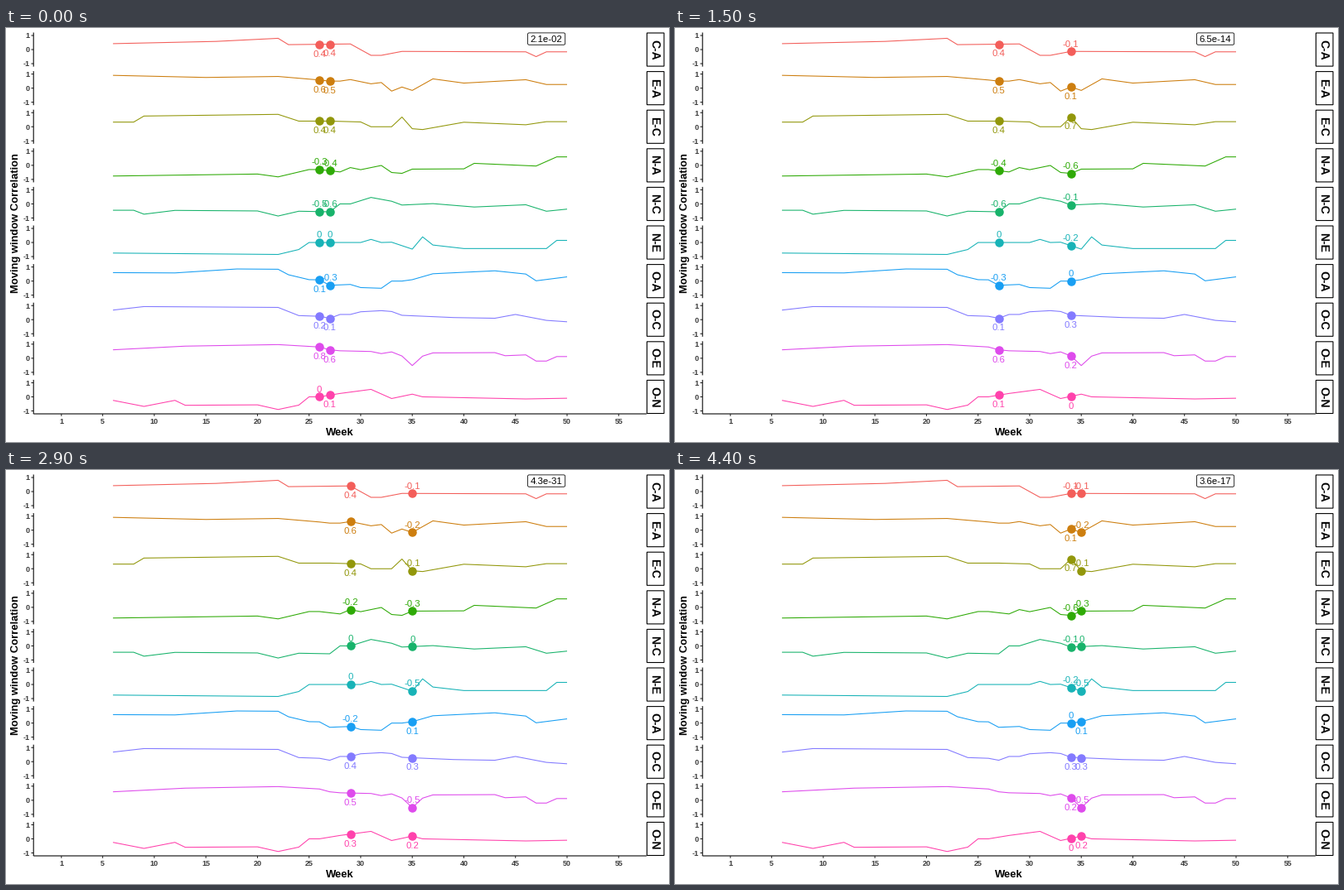
Recreate the animation shown at these times as a matplotlib script. Size 800 by 500 pixels, loop 4500 ms.

```python
from itertools import combinations
from math import atanh, exp, factorial

import matplotlib.pyplot as plt
import numpy as np
from matplotlib.animation import FuncAnimation
from matplotlib.patches import FancyBboxPatch, Rectangle

PT = 0.72  # points per pixel at 100 dpi
LEFT, RIGHT, TOP = 33.2, 772.9, 5.5
HEIGHT, STEP, UNIT = 41.1, 46.6, 17.0
BOTTOM = TOP + 9 * STEP + HEIGHT
TICK, INK = "#222222", "#3b3b3b"
LABEL_SIZE = 11.38
SAMPLE = 55  # effective sample size of one moving window

plt.rcParams.update({"font.family": "Liberation Sans", "path.snap": False,
                     "lines.solid_capstyle": "butt"})
fig = plt.figure(figsize=(8, 5), dpi=100, facecolor="white")
ax = fig.add_axes([0, 0, 1, 1])
ax.set(xlim=(0, 800), ylim=(500, 0))
ax.axis("off")

weeks = np.arange(6, 51)
panels = []


def week_x(week):
    return 54.4 + 12.452 * week


def text(x, y, s, size, color="black", **kw):
    kw = {"ha": "center", "va": "baseline", **kw}
    return ax.text(x, y, s, fontsize=size * PT, color=color, **kw)


def line(x, y, color, **kw):
    return ax.plot(x, y, color=color, lw=1.07 * PT, **kw)[0]


def add_panel(name, color, *points):
    """One row; the curve runs straight between (week, correlation) points."""
    top = TOP + STEP * len(panels)
    zero = top + HEIGHT / 2
    values = np.interp(weeks, *zip(*points))
    ys = zero - UNIT * values

    line([LEFT, LEFT], [top, top + HEIGHT], "black")
    for v in (-1, 0, 1):
        y = zero - UNIT * v
        line([LEFT - 2.75, LEFT], [y, y], TICK)
        text(LEFT - 4.9, y + 3.3, str(v), 9, INK, ha="right", weight="bold")

    ax.add_patch(Rectangle((RIGHT + 0.5, top + 0.5), 20.6, HEIGHT - 1,
                           fc="white", ec="black", lw=1.1 * PT))
    text(782.2, zero, name, 14, va="center", rotation=270, weight="bold")

    line(week_x(weeks), ys, color, solid_joinstyle="round")
    dots = line([], [], color, ls="", marker="o", ms=10.5 * PT, mew=0,
                zorder=3)
    labels = [text(0, 0, "", LABEL_SIZE, color, zorder=4) for _ in range(2)]
    panels.append((values, ys, dots, labels))


add_panel("C-A", "#f35e5a", (6, .42), (16, .58), (22, .8), (23, .35),
          (29, .4), (31, -.41), (32, -.41), (34, -.13), (46, -.16),
          (47, -.5), (48, -.16))
add_panel("E-A", "#cd7e0f", (6, .91), (15, .76), (22, .83), (26, .58),
          (27, .5), (28, .5), (29, .61), (31, .31), (32, .4), (33, -.21),
          (34, .08), (35, -.16), (37, .66), (40, .36), (46, .6), (48, .26))
add_panel("E-C", "#92970b", (8, .33), (9, .76), (22, .88), (24, .4),
          (27, .4), (30, .34), (31, 0), (33, 0), (34, .69), (35, -.14),
          (36, -.2), (40, .32), (46, .14), (48, .36))
add_panel("N-A", "#2faa07", (6, -.76), (20, -.62), (22, -.82), (25, -.3),
          (26, -.3), (28, -.47), (29, -.16), (30, -.31), (32, -.01),
          (33, -.51), (34, -.57), (35, -.27), (40, -.25), (41, .14),
          (47, -.05), (49, .6))
add_panel("N-C", "#18b36b", (8, -.45), (9, -.73), (12, -.46), (20, -.5),
          (22, -.86), (24, -.52), (27, -.56), (28, 0), (29, 0), (31, .46),
          (33, .19), (34, -.08), (37, .02), (41, -.22), (46, -.06),
          (48, -.52), (50, -.37))
add_panel("N-E", "#18b3b7", (6, -.75), (22, -.85), (24, -.5), (25, 0),
          (30, 0), (31, .22), (32, 0), (33, .02), (35, -.47), (36, .4),
          (37, -.18), (40, -.43), (48, -.43), (49, .15))
add_panel("O-A", "#199ff3", (6, .6), (12, .58), (18, .86), (22, .84),
          (23, .45), (25, .1), (26, .09), (27, -.3), (29, -.24), (30, -.46),
          (32, -.51), (33, 0), (34, 0), (35, .1), (37, .52), (43, .73),
          (46, .5), (47, .02), (50, .3))
add_panel("O-C", "#837aff", (6, .68), (9, .93), (22, .87), (24, .29),
          (26, .24), (27, .1), (28, .37), (29, .37), (30, .56), (32, .64),
          (33, .58), (34, .31), (39, .15), (43, .1), (45, .37), (48, -.05),
          (50, -.15))
add_panel("O-E", "#de4bec", (6, .6), (13, .86), (22, .97), (26, .8),
          (27, .6), (28, .53), (31, .48), (32, .33), (33, .45), (34, .16),
          (35, -.52), (36, .15), (37, .38), (43, .4), (44, .18), (46, .24),
          (47, -.2), (48, -.2), (49, .12))
add_panel("O-N", "#ff42ac", (6, -.25), (9, -.68), (12, -.25), (13, -.6),
          (20, -.57), (22, -.9), (24, -.59), (25, 0), (26, 0), (28, .24),
          (31, .53), (33, -.12), (35, .19), (36, 0), (46, -.15), (50, -.1))

# Shared week axis and titles
line([LEFT, RIGHT], [BOTTOM, BOTTOM], "black")
for week in [1, *range(5, 56, 5)]:
    x = week_x(week)
    line([x, x], [BOTTOM, BOTTOM + 2.75], TICK)
    text(x, 478.1, str(week), 9, INK, weight="bold")
text((LEFT + RIGHT) / 2, 491.9, "Week", 13, weight="bold")
text(11.6, (TOP + BOTTOM) / 2, "Moving window Correlation", 13,
     va="center", rotation=90, weight="bold")

# p-value box
box_x, box_y = week_x(48), 13.1
ax.add_patch(FancyBboxPatch((box_x - 22.6, box_y - 7.2), 45.2, 14.4,
                            boxstyle="round,pad=0,rounding_size=1.8",
                            fc="white", ec="black", lw=0.8 * PT, zorder=5))
p_text = text(box_x, box_y + 4.2, "", LABEL_SIZE, zorder=6)

pairs = list(combinations(range(26, 36), 2))


def p_value(a, b):
    """Chi-square test (10 df) on the Fisher z differences of two weeks."""
    half = SAMPLE / 2 * sum((atanh(v[a - 6]) - atanh(v[b - 6])) ** 2
                            for v, *_ in panels)
    return exp(-half) * sum(half ** k / factorial(k) for k in range(5))


def update(frame):
    pair = pairs[frame]
    xs = [week_x(w) for w in pair]
    for values, ys, dots, labels in panels:
        dots.set_data(xs, [ys[w - 6] for w in pair])
        for label, week, x in zip(labels, pair, xs):
            v, y = values[week - 6], ys[week - 6]
            label.set_text(f"{round(v, 1) + 0:g}")
            label.set_position((x, y + (14.9 if v > 0 else -5.6)))
    p_text.set_text(f"{p_value(*pair):.1e}")
    return []


anim = FuncAnimation(fig, update, frames=len(pairs), interval=100,
                     repeat=True, repeat_delay=0)
plt.show()
```
